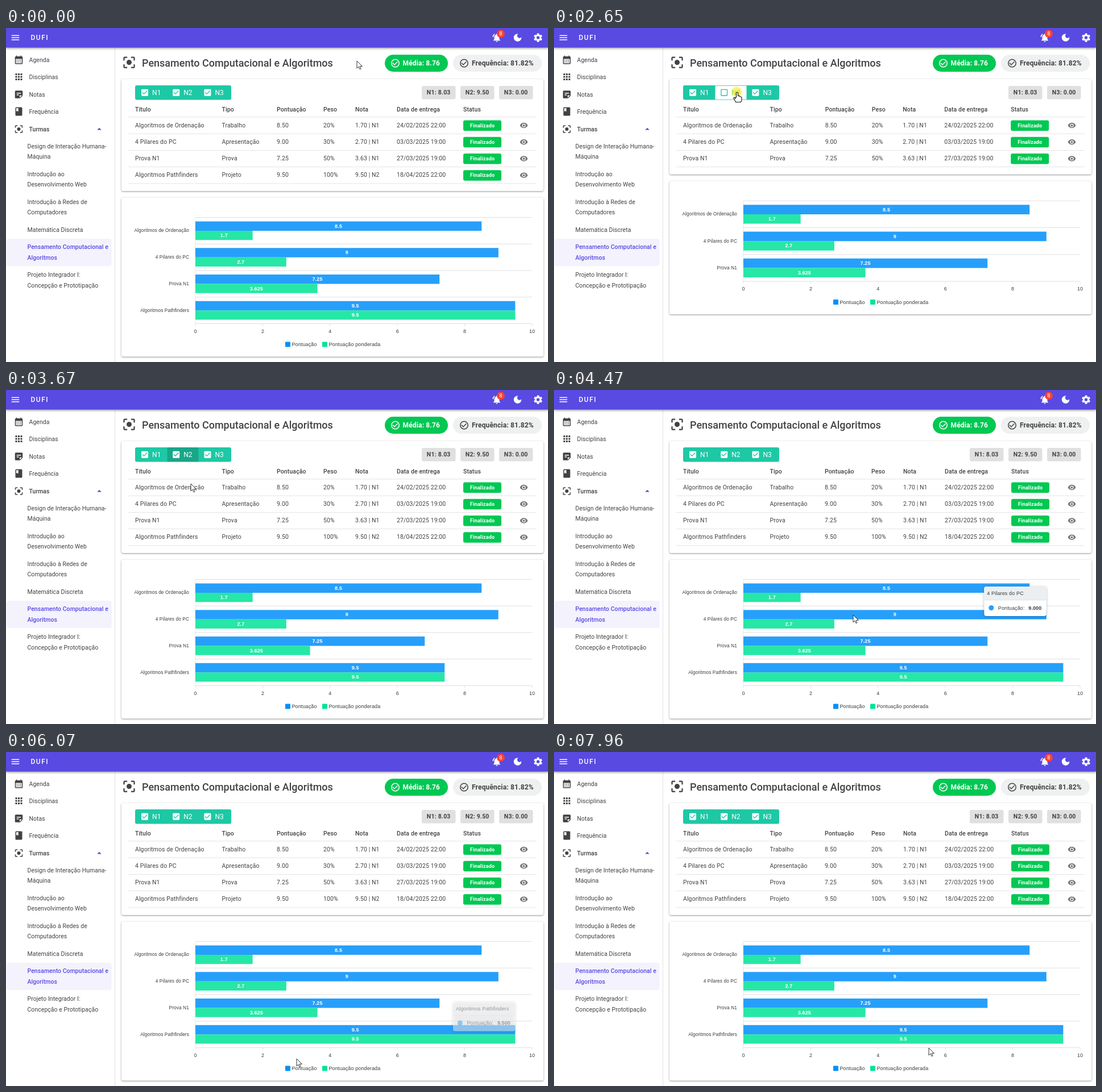
These frames come from a looping animation (953 px wide and 588 px high, 8000 ms). An HTML page with a canvas:

```html
<!DOCTYPE html>
<html lang="pt-BR">
<head>
<meta charset="utf-8">
<title>Turma</title>
<style>
html, body { margin: 0; width: 100%; height: 100%; overflow: hidden; background: #fff; }
canvas { display: block; width: 953px; height: 588px; }
</style>
</head>
<body>
<canvas id="stage"></canvas>
<script>
const W = 953, H = 588, LOOP = 8000;
const canvas = document.getElementById('stage');
const ctx = canvas.getContext('2d');
const dpr = window.devicePixelRatio || 1;
canvas.width = W * dpr;
canvas.height = H * dpr;

const UI = 'Roboto, sans-serif', CHART = '"Liberation Sans", Arial, sans-serif';
const PRIMARY = '#594ae2', TEAL = '#1ec8a5', GREEN = '#00c853', INK = '#424242';
const SERIES = [
  { name: 'Pontuação', bar: '#269ffb', key: '#008ffb' },
  { name: 'Pontuação ponderada', bar: '#26e7a6', key: '#00e396' }
];
const TASKS = [
  { cells: ['Algoritmos de Ordenação', 'Trabalho', '8.50', '20%', '1.70 | N1', '24/02/2025 22:00'], values: [8.5, 1.7] },
  { cells: ['4 Pilares do PC', 'Apresentação', '9.00', '30%', '2.70 | N1', '03/03/2025 19:00'], values: [9, 2.7] },
  { cells: ['Prova N1', 'Prova', '7.25', '50%', '3.63 | N1', '27/03/2025 19:00'], values: [7.25, 3.625] },
  { cells: ['Algoritmos Pathfinders', 'Projeto', '9.50', '100%', '9.50 | N2', '18/04/2025 22:00'], values: [9.5, 9.5] }
];
const HEADS = ['Título', 'Tipo', 'Pontuação', 'Peso', 'Nota', 'Data de entrega', 'Status'];

const path = d => new Path2D(d);
const ICON = {
  menu: path('M3 18h18v-2H3v2zm0-5h18v-2H3v2zm0-7v2h18V6H3z'),
  eye: path('M12 4.5C7 4.5 2.73 7.61 1 12c1.73 4.39 6 7.5 11 7.5s9.27-3.11 11-7.5c-1.73-4.39-6-7.5-11-7.5zM12 17a5 5 0 1 1 0-10 5 5 0 0 1 0 10zm0-8a3 3 0 1 0 0 6 3 3 0 0 0 0-6z'),
  focus: path('M12 8a4 4 0 1 0 0 8 4 4 0 0 0 0-8zM5 15H3v4a2 2 0 0 0 2 2h4v-2H5zM5 5h4V3H5a2 2 0 0 0-2 2v4h2zM19 3h-4v2h4v4h2V5a2 2 0 0 0-2-2zM19 19h-4v2h4a2 2 0 0 0 2-2v-4h-2z'),
  calendar: path('M19 4h-1V2h-2v2H8V2H6v2H5a2 2 0 0 0-2 2v14a2 2 0 0 0 2 2h14a2 2 0 0 0 2-2V6a2 2 0 0 0-2-2zm0 16H5V10h14zM9 14H7v-2h2zm4 0h-2v-2h2zm4 0h-2v-2h2zm-8 4H7v-2h2zm4 0h-2v-2h2zm4 0h-2v-2h2z'),
  note: path('M19 3H5a2 2 0 0 0-2 2v14a2 2 0 0 0 2 2h10l6-6V5a2 2 0 0 0-2-2zM7 8h10v2H7zm5 6H7v-2h5zm2 5.5V14h5.5z'),
  book: path('M18 2H6a2 2 0 0 0-2 2v16a2 2 0 0 0 2 2h12a2 2 0 0 0 2-2V4a2 2 0 0 0-2-2zM6 4h5v8l-2.5-1.5L6 12z'),
  up: path('M7 14l5-5 5 5z'),
  bell: path('M18 11c0-3-1.6-5.6-4.5-6.3V4a1.5 1.5 0 0 0-3 0v.7C7.6 5.400 6 8 6 11v5l-2 2v1h16v-1l-2-2zM10 20a2 2 0 0 0 4 0zM7.600 4L6.200 2.600A10.500 10.500 0 0 0 2 10.500h2A8.500 8.500 0 0 1 7.600 4zM20 10.500h2a10.500 10.500 0 0 0-4.200-7.900L16.400 4A8.500 8.500 0 0 1 20 10.500z'),
  moon: path('M12 3a9 9 0 1 0 8.900 7.640A5.400 5.400 0 1 1 13.360 3.100 9 9 0 0 0 12 3z'),
  done: path('M16.600 7.600L10 14.200 6.400 10.600 5 12l5 5 8-8zM12 2a10 10 0 1 0 0 20 10 10 0 0 0 0-20zm0 18a8 8 0 1 1 0-16 8 8 0 0 1 0 16z'),
  on: path('M19 3H5a2 2 0 0 0-2 2v14a2 2 0 0 0 2 2h14a2 2 0 0 0 2-2V5a2 2 0 0 0-2-2zm-9 14l-5-5 1.400-1.400L10 14.200l7.600-7.600L19 8z'),
  off: path('M19 3H5a2 2 0 0 0-2 2v14a2 2 0 0 0 2 2h14a2 2 0 0 0 2-2V5a2 2 0 0 0-2-2zm0 16H5V5h14z'),
  arrow: path('M0 0V16.500L3.900 13 6.400 18.800 9 17.600 6.600 12H12z'),
  hand: path('M-1.500 1Q0-1 1.500 1V6.500Q3.500 5.800 4 7.300 5.800 6.700 6.200 8.200 8 8 8 10V13Q8 15 6.500 17.500H-2.500Q-3-15 -5.500 12Q-7 9.500-5 9.300L-3 11.500V9H-1.500z'.replace('-3-15 -5.500 12', '-3.500 15-5.500 12'))
};

const clamp = v => Math.max(0, Math.min(1, v));
const ramp = (t, a, d) => clamp((t - a) / d);
const ease = p => 1 - (1 - p) * (1 - p);
const smooth = p => p * p * (3 - 2 * p);
const mix = (a, b, p) => a + (b - a) * p;

function text(s, x, y, size, o = {}) {
  ctx.font = `${o.weight || 400} ${size}px ${o.font || UI}`;
  ctx.letterSpacing = `${o.gap || 0}px`;
  ctx.textAlign = o.align || 'left';
  ctx.fillStyle = o.color || INK;
  ctx.fillText(s, x, y + size * 0.355);
}
function box(x, y, w, h, color, r = 0) {
  ctx.fillStyle = color;
  ctx.beginPath();
  ctx.roundRect(x, y, w, h, r);
  ctx.fill();
}
function disc(x, y, r, color) {
  ctx.fillStyle = color;
  ctx.beginPath();
  ctx.arc(x, y, r, 0, 7);
  ctx.fill();
}
function icon(shape, x, y, size, color) {
  ctx.save();
  ctx.translate(x - size / 2, y - size / 2);
  ctx.scale(size / 24, size / 24);
  ctx.fillStyle = color;
  ctx.fill(shape, 'evenodd');
  ctx.restore();
}
function raised(x, y, w, h, color, r, blur, alpha) {
  ctx.save();
  ctx.shadowColor = `rgba(0,0,0,${alpha})`;
  ctx.shadowBlur = blur * dpr;
  ctx.shadowOffsetY = dpr;
  box(x, y, w, h, color, r);
  ctx.restore();
}
function faded(alpha, draw) {
  if (alpha <= 0) return;
  ctx.save();
  ctx.globalAlpha *= alpha;
  draw();
  ctx.restore();
}

function gear(x, y) {
  ctx.save();
  ctx.translate(x, y);
  ctx.fillStyle = '#fff';
  for (let i = 0; i < 6; i++) {
    ctx.beginPath();
    ctx.roundRect(-2, -7.5, 4, 4, 0.6);
    ctx.fill();
    ctx.rotate(Math.PI / 3);
  }
  ctx.restore();
  ctx.strokeStyle = '#fff';
  ctx.lineWidth = 3;
  ctx.beginPath();
  ctx.arc(x, y, 4.2, 0, 7);
  ctx.stroke();
}

function appBar() {
  raised(0, -4, W, 38.5, PRIMARY, 0, 4, 0.4);
  icon(ICON.menu, 16.5, 17, 18, '#fff');
  text('DUFI', 43.5, 17, 12, { weight: 500, gap: 1.5, color: '#fff' });
  icon(ICON.bell, 863, 17, 18, '#fff');
  disc(870, 10, 7, '#f44336');
  text('8', 870, 10, 9.5, { align: 'center', color: '#fff' });
  icon(ICON.moon, 899.5, 17, 18, '#fff');
  gear(935.5, 17);
}

function sidebar() {
  box(191, 34, 1, H, '#e2e2e2');
  const main = [['calendar', 'Agenda', 56], [null, 'Disciplinas', 86], ['note', 'Notas', 117],
    ['book', 'Frequência', 147], ['focus', 'Turmas', 178]];
  for (const [name, label, y] of main) {
    if (name) icon(ICON[name], 22.5, y, 18, INK);
    else for (let i = 0; i < 9; i++) box(16.5 + (i % 3) * 4.5, y - 6 + (i / 3 | 0) * 4.5, 3, 3, INK);
    text(label, 40.5, y, 10.5, { weight: label === 'Turmas' ? 500 : 400, gap: 0.04 });
  }
  icon(ICON.up, 164, 178, 18, PRIMARY);
  box(1, 371, 184.5, 48, '#f3f2fd', 4);
  const sub = [['Design de Interação Humana-', 208], ['Máquina', 226.5], ['Introdução ao', 257],
    ['Desenvolvimento Web', 275.5], ['Introdução à Redes de', 306], ['Computadores', 324.5],
    ['Matemática Discreta', 355], ['Pensamento Computacional e', 385.5], ['Algoritmos', 404],
    ['Projeto Integrador I:', 434.5], ['Concepção e Prototipação', 453]];
  for (const [label, y] of sub) {
    const active = y > 380 && y < 410;
    text(label, 37.5, y, 10.5, { gap: 0.04, weight: active ? 500 : 400, color: active ? PRIMARY : INK });
  }
}

function heading() {
  icon(ICON.focus, 216.5, 60.5, 27, INK);
  text('Pensamento Computacional e Algoritmos', 239, 61.5, 18, { weight: 500 });
  box(666, 47, 111, 30, GREEN, 15);
  icon(ICON.done, 684.5, 62, 18, '#fff');
  text('Média: 8.76', 697.5, 62, 12, { weight: 700, gap: 0.15, color: '#fff' });
  box(786, 47, 156, 30, '#eff0f0', 15);
  icon(ICON.done, 805.5, 62, 18, INK);
  text('Frequência: 81.82%', 819, 62, 12, { weight: 700, gap: 0.15 });
}

function toggles(t, off) {
  box(227, 101, 169, 25.5, TEAL, 3);
  if (off) {
    box(283.5, 101.7, 55, 24, '#fff');
    faded(0.25 * (1 - ramp(t, 1220, 1220)), () => box(283.5, 101.7, 55, 24, TEAL));
  } else if (t >= 2740) {
    faded(0.17 * (1 - ramp(t, 3690, 200)), () => box(283.5, 101, 55, 25.5, '#000'));
  }
  ['N1', 'N2', 'N3'].forEach((label, i) => {
    const empty = off && i === 1, color = empty ? TEAL : '#fff', x = 244 + i * 55.2;
    icon(empty ? ICON.off : ICON.on, x, 113.7, 16, color);
    text(label, x + 13, 113.7, 12, { gap: 0.1, color });
  });
}

function grades(t, off) {
  const n = off ? 3 : 4;
  raised(203, 90, 742, 80 + n * 29.25, '#fff', 3, 3, 0.42);
  toggles(t, off);
  const tags = off ? ['N1: 8.03', 'N3: 0.00'] : ['N1: 8.03', 'N2: 9.50', 'N3: 0.00'];
  tags.forEach((s, i) => {
    const x = 867 - (tags.length - 1 - i) * 68;
    box(x, 102, 59.5, 23.5, '#e0e0e0', 3);
    text(s, x + 29.7, 113.7, 10.5, { weight: 700, gap: 0.2, align: 'center' });
  });
  const s = off ? 1 : 0;
  const cols = [227, 379.5, 476 + s * 0.7, 558 + s * 0.7, 614 - s * 0.7, 687 - s * 0.8, 804 - s * 0.8];
  HEADS.forEach((h, i) => text(h, cols[i], 143, 10.5, { weight: 500, gap: 0.11 }));
  box(215, 156.5, 718, 0.8, '#dcdcdc');
  TASKS.slice(0, n).forEach(({ cells }, r) => {
    const y = 171 + r * 29.25;
    cells.forEach((c, i) => text(c, cols[i], y, 10.5, { gap: 0.11 }));
    box(cols[6], y - 8.5, 67, 18.5, GREEN, 3);
    text('Finalizado', cols[6] + 33.6, y + 0.5, 9, { weight: 700, gap: 0.15, align: 'center', color: '#fff' });
    icon(ICON.eye, 910.5, y + 0.5, 15, '#757575');
    box(215, y + 14.8, 718, 0.8, '#dcdcdc');
  });
}

const X0 = 333, UNIT = 59.2;
const growth = (t, start, j, n) => Math.sin(ramp(t, start + j * 668 / n, 800) * Math.PI / 2);

function chart(t, off, dim) {
  const n = off ? 3 : 4, top = off ? 304.25 : 333.5, rowH = off ? 47.25 : 46.75;
  const start = off ? 1200 : t >= 2740 ? 2715 : -9000;
  const bottom = top + n * rowH, barH = rowH * 0.35;
  raised(203, top - 35, 742, bottom - top + 93, '#fff', 3, 3, 0.42);
  for (let i = 0; i <= n; i++) box(X0, top + i * rowH - 0.4, 592, 0.8, '#dfdfdf');
  box(X0 - 0.4, top, 0.8, bottom - top, '#dfdfdf');
  for (let v = 0; v <= 10; v += 2) {
    const x = X0 + v * UNIT;
    box(x - 0.4, bottom, 0.8, 4.5, '#dfdfdf');
    text(v, x, bottom + 13, 9, { font: CHART, align: 'center', color: '#373d3f' });
  }
  const shown = ramp(t, start + 760, 170);
  TASKS.slice(0, n).forEach((task, j) => {
    const y = top + j * rowH;
    text(task.cells[0], 322, y + rowH / 2 - 0.5, 8.25, { font: CHART, gap: 0.13, align: 'right', color: '#373d3f' });
    task.values.forEach((v, s) => faded(dim[s], () => {
      const by = y + rowH * 0.15 + s * barH;
      box(X0, by, v * UNIT * growth(t, start, j, n), barH, SERIES[s].bar);
      faded(shown, () => text(v, X0 + v * UNIT / 2, by + barH / 2 - 0.2, 9,
        { font: CHART, weight: 700, gap: 0.15, align: 'center', color: '#fff' }));
    }));
  });
  [491, 556].forEach((x, s) => {
    box(x, bottom + 32, 9, 9, SERIES[s].key, 1);
    text(SERIES[s].name, x + 11.5, bottom + 36.5, 9, { font: CHART, gap: 0.12, color: '#373d3f' });
  });
}

// [time, row, series] of each hovered bar
const HOVERS = [[4330, 1, 0], [5080, 1, 1], [5840, 2, 0], [5890, 2, 1], [5940, 3, 0]];
function tipPlace([, row, s]) {
  return { right: X0 + TASKS[row].values[s] * UNIT, y: 340.5 + row * 46.75 + s * 16.4 + 2.8 - 44 + (s ? 0 : 0) };
}
function tooltip(t) {
  const alpha = ease(ramp(t, 4330, 130)) * (1 - ease(ramp(t, 6025, 150)));
  if (alpha <= 0) return;
  const cur = HOVERS.filter(h => h[0] <= t);
  let place = tipPlace(HOVERS[0]);
  for (const h of cur) {
    const to = tipPlace(h), p = ease(ramp(t, h[0], 130));
    place = { right: mix(place.right, to.right, p), y: mix(place.y, to.y, p) };
  }
  const [, row, s] = cur[cur.length - 1];
  const w = s ? 155 : 109.5, h = 52, x = place.right - w, y = place.y;
  faded(alpha, () => {
    raised(x, y, w, h, '#fff', 4, 4, 0.3);
    box(x, y, w, 24, '#eceff1', [4, 4, 0, 0]);
    box(x, y + 23.5, w, 0.8, '#dddddd');
    text(TASKS[row].cells[0], x + 5, y + 12, 9, { font: CHART, gap: 0.13, color: '#373d3f' });
    disc(x + 12.5, y + 37.5, 4.5, SERIES[s].bar);
    text(SERIES[s].name + ':', x + 24.5, y + 37.5, 9, { font: CHART, gap: 0.12, color: '#373d3f' });
    text(TASKS[row].values[s].toFixed(3), x + w - 8.500, y + 37.5, 9,
      { font: CHART, weight: 700, gap: 0.1, align: 'right', color: '#373d3f' });
  });
}

// pointer keys: time, x, y
const MOVES = [[290, 617, 58], [1060, 322, 113], [3440, 322, 113], [3670, 325, 165], [4270, 523, 336],
  [4460, 526, 396], [4890, 526, 396], [5480, 470, 407], [5750, 470, 407], [6070, 511, 540],
  [6330, 512, 557], [6930, 512, 557], [7370, 630, 558], [7880, 630, 558], [7960, 659, 521]];
function pointer(t) {
  if (t <= MOVES[0][0]) return MOVES[0].slice(1);
  const i = MOVES.findIndex(m => m[0] >= t);
  if (i < 0) return MOVES[MOVES.length - 1].slice(1);
  const a = MOVES[i - 1], b = MOVES[i], p = smooth(ramp(t, a[0], b[0] - a[0]));
  return [mix(a[1], b[1], p), mix(a[2], b[2], p)];
}
function cursor(t) {
  const [x, y] = pointer(t);
  const overToggle = x > 227 && x < 396 && y > 101 && y < 126.5;
  const overLegend = y > 551 && y < 563;
  for (const [a, b] of [[1140, 1220], [2650, 2740]])
    if (t >= a && t < b) disc(321, 112.5, 9, 'rgba(255,235,20,.6)');
  ctx.save();
  ctx.translate(x, y);
  ctx.strokeStyle = '#111';
  ctx.fillStyle = '#fff';
  ctx.lineJoin = 'round';
  if (!overToggle && !overLegend) ctx.scale(0.78, 0.78);
  ctx.lineWidth = 1.1;
  const shape = overToggle || overLegend ? ICON.hand : ICON.arrow;
  ctx.fill(shape);
  ctx.stroke(shape);
  ctx.restore();
}

// hovering a legend entry fades the other series
const LEGEND = [[6190, 7090, 1], [7130, 7900, 0]];
function dimming(t) {
  const dim = [1, 1];
  for (const [a, b, s] of LEGEND) if (t >= a && t < b) dim[s] = 1 - 0.8 * ease(ramp(t, a, 150));
  return dim;
}

function draw(t) {
  const off = t >= 1220 && t < 2740;
  ctx.setTransform(dpr, 0, 0, dpr, 0, 0);
  ctx.fillStyle = '#fff';
  ctx.fillRect(0, 0, W, H);
  sidebar();
  heading();
  grades(t, off);
  chart(t, off, dimming(t));
  tooltip(t);
  appBar();
  cursor(t);
}

const began = performance.now();
function tick() {
  draw((performance.now() - began) % LOOP);
  requestAnimationFrame(tick);
}
tick();
</script>
</body>
</html>
```
